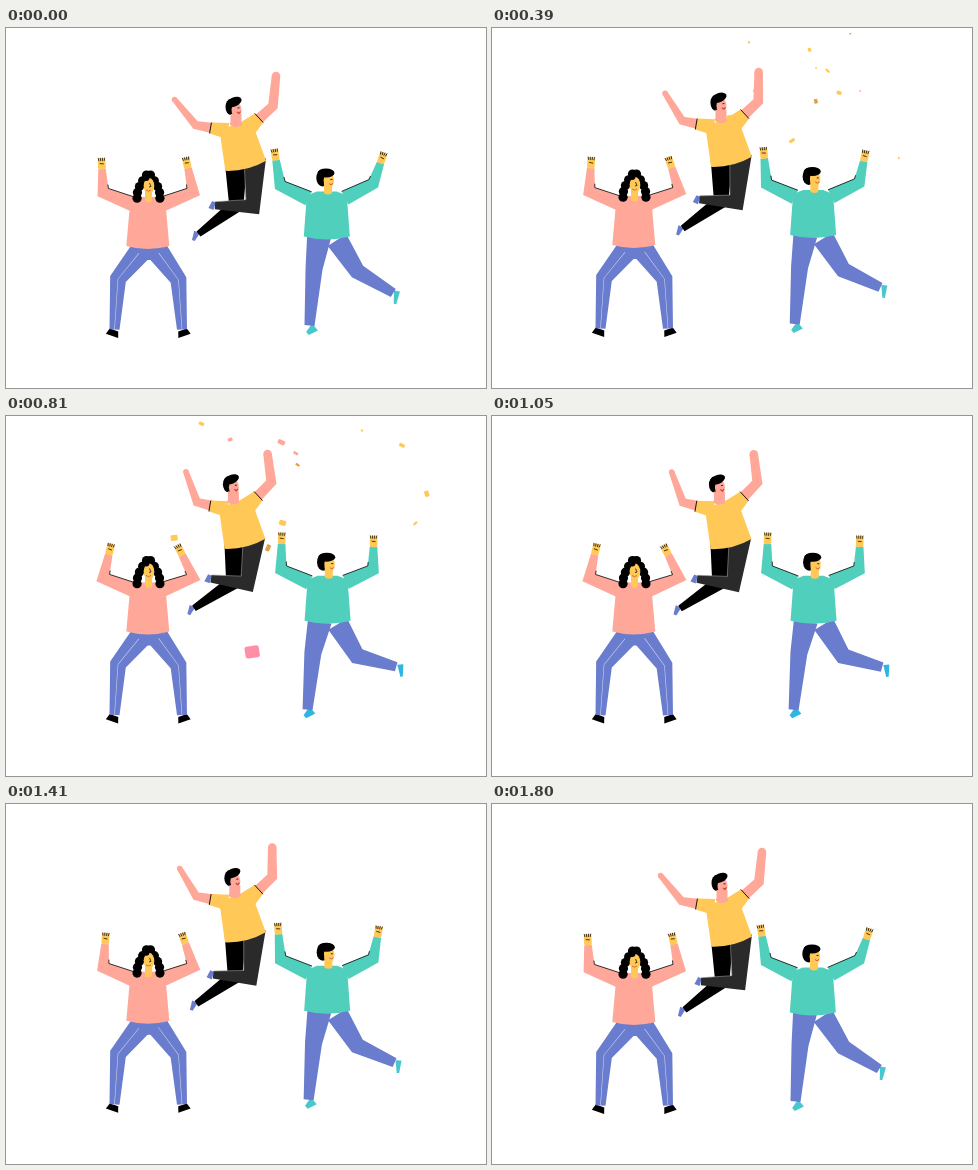
An HTML page with a canvas for the animation above (1830 ms loop, 480x360 px).

```html
<!DOCTYPE html>
<html>
<head>
<meta charset="utf-8">
<title>Jumping friends</title>
<style>
html, body { margin: 0; width: 100%; height: 100%; overflow: hidden; background: #fff; }
canvas { display: block; width: 480px; height: 360px; }
</style>
</head>
<body>
<canvas id="stage" width="480" height="360"></canvas>
<script>
const c = document.getElementById('stage').getContext('2d');
const LOOP = 1830, STEP = 30;
const PINK = '#ffa799', GOLD = '#ffc857', TEAL = '#50cfbd', BLUE = '#697ccd',
      DARK = '#2a2a2a', BLACK = '#000', PALE = '#c9d0f0', RED = '#c8432f';
let lift = 0; // 0 = lowest pose, 1 = highest pose

// Draw a figure that rises by dx, dy at full lift.
function group(dx, dy, paint) {
  c.save();
  c.translate(dx * lift, dy * lift);
  paint();
  c.restore();
}

function line(color, width, points) {
  c.beginPath();
  points.forEach(([x, y]) => c.lineTo(x, y));
  c.strokeStyle = color;
  c.lineWidth = width;
  c.stroke();
}

function oval(color, x, y, rx, ry = rx, tilt = 0) {
  c.fillStyle = color;
  c.beginPath();
  c.ellipse(x, y, rx, ry, tilt, 0, 7);
  c.fill();
}

// Tapered limb through joints [x, y, dx, dy], where dx, dy is the shift at full lift.
// Returns the tip, its direction, both edges and the edge inside the bend.
function limb(color, w0, w1, joints) {
  const p = joints.map(([x, y, dx = 0, dy = 0]) => [x + dx * lift, y + dy * lift]);
  const last = p.length - 1, left = [], right = [];
  const heading = i => Math.atan2(p[i + 1][1] - p[i][1], p[i + 1][0] - p[i][0]);
  let inner = left;
  p.forEach(([x, y], i) => {
    const from = heading(Math.max(i - 1, 0)), to = heading(Math.min(i, last - 1));
    const bend = Math.atan2(Math.sin(to - from), Math.cos(to - from)) / 2;
    const r = (w0 + (w1 - w0) * i / last) / 2 / Math.max(Math.cos(bend), 0.75);
    const normal = from + bend + Math.PI / 2;
    const ox = r * Math.cos(normal), oy = r * Math.sin(normal);
    left.push([x + ox, y + oy]);
    right.push([x - ox, y - oy]);
    if (bend < 0) inner = right;
  });
  c.beginPath();
  [...left, ...right.slice().reverse()].forEach(([x, y]) => c.lineTo(x, y));
  c.fillStyle = color;
  c.fill();
  return { tip: p[last], angle: heading(last - 1), left, right, inner };
}

// Sleeved arm with a crease at the elbow and a raised fist.
function arm(color, joints) {
  const { tip, angle, inner: [a, b, d] } = limb(color, 14.8, 7.5, joints);
  line(BLACK, 0.8, [a, b, [b[0] + (d[0] - b[0]) / 5, b[1] + (d[1] - b[1]) / 5]]);
  c.save();
  c.translate(...tip);
  c.rotate(angle + Math.PI / 2);
  c.fillStyle = GOLD;
  c.beginPath();
  c.roundRect(-3.8, -11, 7.6, 11.5, 2);
  c.fill();
  for (let x = -3.4; x < 4; x += 2.2) line(BLACK, 0.7, [[x, -11.2], [x * 0.8, -8]]);
  line(BLACK, 0.7, [[-2, -5.5], [2, -5]]);
  c.restore();
}

function bareArm(tipWidth, joints) {
  const { tip } = limb(PINK, 11, tipWidth, joints);
  oval(PINK, ...tip, tipWidth / 2);
}

function shortSleeve(w0, w1, joints) {
  const { left, right } = limb(GOLD, w0, w1, joints);
  line(BLACK, 0.9, [left[1], right[1]]);
}

function torso(color, x, y, top, bottom, height, tilt = 0) {
  c.save();
  c.translate(x, y);
  c.rotate(tilt);
  c.fillStyle = color;
  c.beginPath();
  for (const s of [-1, 1]) {
    c.lineTo(s * top * (s < 0 ? 1 : 0.5), s < 0 ? 4 : 0);
    c.lineTo(s * top * (s < 0 ? 0.5 : 1), s < 0 ? 0 : 4);
  }
  c.lineTo(bottom, height - 3);
  c.quadraticCurveTo(0, height + 3, -bottom, height - 3);
  c.fill();
  c.restore();
}

function woman() {
  limb(BLACK, 9, 13, [[108, 302], [106, 307.8]]);
  limb(BLACK, 9, 13, [[176.5, 302], [178.5, 307.8]]);
  for (const leg of [[[134, 224], [112, 251], [108.5, 301.5]],
                     [[152, 224], [172.5, 252], [176, 301.5]]]) {
    limb(BLUE, 22, 10, leg);
    limb(PALE, 0.6, 0.6, leg);
  }
  limb(BLUE, 37, 4, [[142.5, 217], [142.5, 232]]);

  torso(PINK, 141.8, 169, 17.5, 21.5, 52);
  arm(PINK, [[127.5, 176.5], [97, 164.3], [96, 141, 7, 0]]);
  arm(PINK, [[157, 176], [187.5, 163.8], [182, 140, -6, 1.5]]);

  for (const side of [-1, 1])
    for (let i = 0; i < 5; i++)
      oval(BLACK, 142.5 + side * (2 + 9.5 * Math.sin(i * 0.42)), 147 + i * 5.8, 4.6);
  limb(GOLD, 7, 7, [[142.5, 160], [142.5, 172]]);
  oval(GOLD, 142.5, 172, 3.5, 2.5);
  oval(GOLD, 143, 158, 5.3, 8);
  oval(BLACK, 140, 149.5, 3.5);
  line(BLACK, 0.7, [[143.5, 155], [145, 158.5], [143, 159]]);
  line(RED, 0.7, [[140, 162], [142.5, 163.2], [145, 162]]);
}

function jumper() {
  limb(BLUE, 6, 3, [[191, 204, -4, -4], [187.3, 212.5, -4, -4]]);
  limb(BLACK, 22, 6.5, [[230, 136], [230, 178, -2.5, -1], [192.5, 206, -4, -4]]);
  limb(BLUE, 4, 5.5, [[208, 173.8, -3.5, -5], [205, 181, -3.5, -5]]);
  const front = limb(DARK, 22, 7.5, [[249, 130], [246.5, 179, -5, -1], [209, 177.5, -3.5, -5]]);
  line('#999', 0.6, front.inner);

  bareArm(5.5, [[212, 101], [189.5, 97, 2, -1], [168.5, 71.5, 12.5, -6]]);
  bareArm(8.5, [[246, 97], [267, 78, -1, -2], [270, 48, -8, 0]]);
  torso(GOLD, 229.5, 97, 17, 21, 45, -0.245);
  shortSleeve(16, 11, [[222, 103], [204.5, 100]]);
  shortSleeve(19, 12.5, [[240, 102], [253, 90]]);

  group(-2, -0.7, () => {
    oval(BLACK, 225, 79, 5.5, 8);
    limb(PINK, 11, 11, [[230, 86], [230, 96]]);
    oval(PINK, 230, 96, 6, 3);
    oval(PINK, 230.5, 82, 5, 7.5);
    oval(BLACK, 228, 74, 8, 4.5, -0.4);
    line(BLACK, 0.8, [[231.5, 80], [233.5, 79.8]]);
    line(RED, 1.2, [[231, 84], [233, 85.5], [234.5, 83.5]]);
  });
}

function dancer(shoe) {
  limb(shoe, 9, 4, [[309, 299, -3.5, -1], [301.5, 305.5, -3.5, -1]]);
  limb(shoe, 6, 2.5, [[391, 263, 2.7, -11], [389, 276, 6, -12]]);
  limb(BLUE, 24, 10, [[313, 209], [308, 241, -2, 0], [303.5, 297.5, -2.8, 0]]);
  limb(BLUE, 22, 9.5, [[331, 212], [351.5, 243.5, -1, 0.5], [387.3, 265, 2.2, -10.7]]);

  torso(TEAL, 320.8, 163.5, 20, 23, 48);
  arm(TEAL, [[302.5, 170.5], [274, 157.3], [270, 132, 5, -0.5]]);
  arm(TEAL, [[339, 170], [367.5, 155.5, -1, 2], [374.5, 135, -8, -0.5]]);

  oval(BLACK, 316.5, 150, 6.2, 8.5);
  limb(GOLD, 8, 8, [[322, 155], [322, 164]]);
  oval(GOLD, 322, 164, 4, 2.5);
  oval(GOLD, 322.8, 152.5, 5.2, 8);
  oval(BLACK, 320, 145, 8.5, 4.5);
  line(BLACK, 0.8, [[324.5, 151.5], [326.5, 151.5]]);
  line(RED, 0.8, [[323, 155.5], [325, 156.8], [327, 155.3]]);
}

function flake(color, x, y, size, turn) {
  c.save();
  c.translate(x, y);
  c.rotate(turn);
  c.scale(0.75 + 0.25 * Math.cos(turn * 4), 1);
  c.fillStyle = color;
  c.beginPath();
  c.roundRect(-size / 2, -size / 2, size, size * 1.15, size / 5);
  c.fill();
  c.restore();
}

let seed = 7;
const rand = () => (seed = seed * 16807 % 2147483647) / 2147483647;
const flakes = Array.from({ length: 34 }, (_, i) => ({
  born: 40 + 700 * rand(), life: 280 + 80 * rand(),
  x: 300 + 130 * (rand() + rand() - 1), y: 120 * rand() ** 1.5 - 15,
  vx: 0.2 * (rand() - 0.5), vy: 0.06 + 0.08 * rand(),
  size: 2 + 4.5 * rand(), color: [GOLD, GOLD, GOLD, '#e0a04c', PINK][i % 5], turn: 6 * rand()
}));

function confetti(t) {
  for (const f of flakes) {
    const age = t - f.born;
    if (age > 0 && age < f.life)
      flake(f.color, f.x + f.vx * age, f.y + f.vy * age,
            f.size * Math.min(1, age / 90), f.turn + age / 220);
  }
  // one large piece falling close by
  const age = t - 540;
  if (age > -30 && age < 360)
    flake('#ff8fa6', 293 - 0.17 * age, 9 + 0.84 * age, 12.5, age / 190);
}

function draw(now) {
  const t = Math.floor(now % LOOP / STEP) * STEP;
  lift = (1 - Math.cos(2 * Math.PI * t / LOOP)) / 2;
  c.fillStyle = '#fff';
  c.fillRect(0, 0, 480, 360);
  group(0, -2.6, woman);
  group(-0.7, -10.3, jumper);
  group(0.8, -4, () => dancer(t > 400 && t < 1110 ? '#2fb5e2' : '#48c7cf'));
  confetti(t);
}

const start = performance.now();
function tick() {
  draw(performance.now() - start);
  requestAnimationFrame(tick);
}
tick();
</script>
</body>
</html>
```
